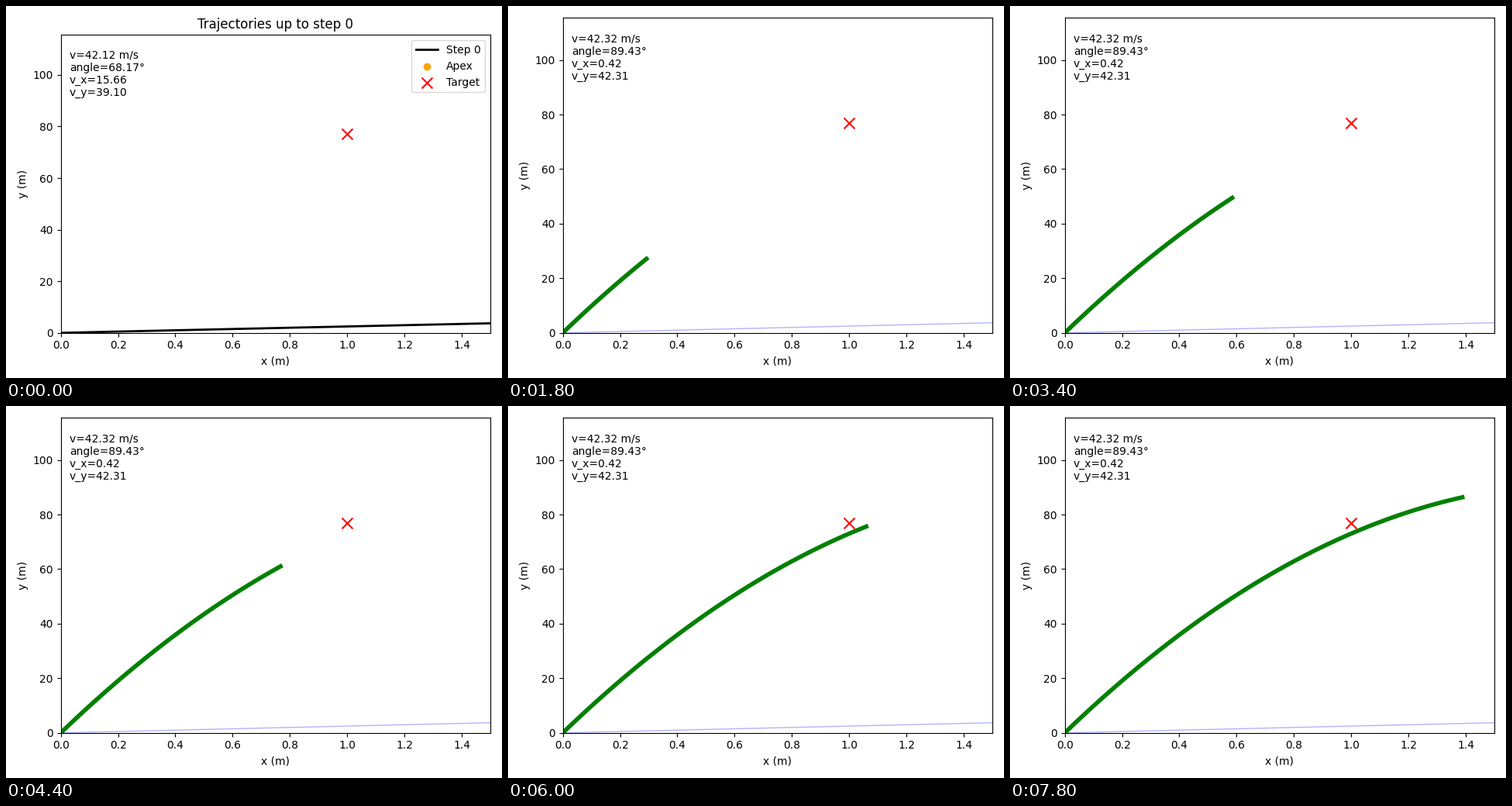
Write a matplotlib script that moves like this. It is 640 px wide and 480 px high and loops after 8000 ms.

```python
import numpy as np
import matplotlib.pyplot as plt
from matplotlib.animation import FuncAnimation

G = 9.81
TARGET = (1, 77)
FRAMES, INTERVAL = 40, 200
FIRST = (15.66, 39.10)
SECOND = (0.4193, 42.31)

fig, ax = plt.subplots(figsize=(6.4, 4.8), dpi=100)


def flight(vx, vy, n=100):
    t = np.linspace(0, 2 * vy / G, n)
    return vx * t, vy * t - G * t**2 / 2


def setup(speed, angle, vx, vy):
    ax.clear()
    ax.set_xlim(0, 1.5 * TARGET[0])
    ax.set_ylim(0, 1.5 * TARGET[1])
    ax.set_xlabel("x (m)")
    ax.set_ylabel("y (m)")
    info = f"v={speed:.2f} m/s\nangle={angle:.2f}°\nv_x={vx:.2f}\nv_y={vy:.2f}"
    ax.text(0.02, 0.95, info, transform=ax.transAxes, va="top")


def draw_target():
    ax.scatter(*TARGET, s=100, c="red", marker="x", label="Target")


def draw_summary():
    setup(42.12, 68.17, *FIRST)
    vx, vy = FIRST
    ax.plot(*flight(vx, vy), color="black", lw=2, label="Step 0")
    ax.scatter(vx * vy / G, vy**2 / (2 * G), c="orange", label="Apex")
    draw_target()
    ax.set_title("Trajectories up to step 0")
    ax.legend(loc="upper right")


def draw_flight(count):
    setup(42.32, 89.43, *SECOND)
    ax.plot(*flight(*FIRST), color="blue", alpha=0.3, lw=1)
    x, y = flight(*SECOND)
    ax.plot(x[:count], y[:count], color="green", lw=4)
    draw_target()


def update(i):
    if i == 0:
        draw_summary()
    else:
        draw_flight(i)
    fig.tight_layout()
    return []


anim = FuncAnimation(fig, update, frames=FRAMES, interval=INTERVAL,
                     init_func=lambda: update(0), repeat=True, repeat_delay=0)
plt.show()
```
